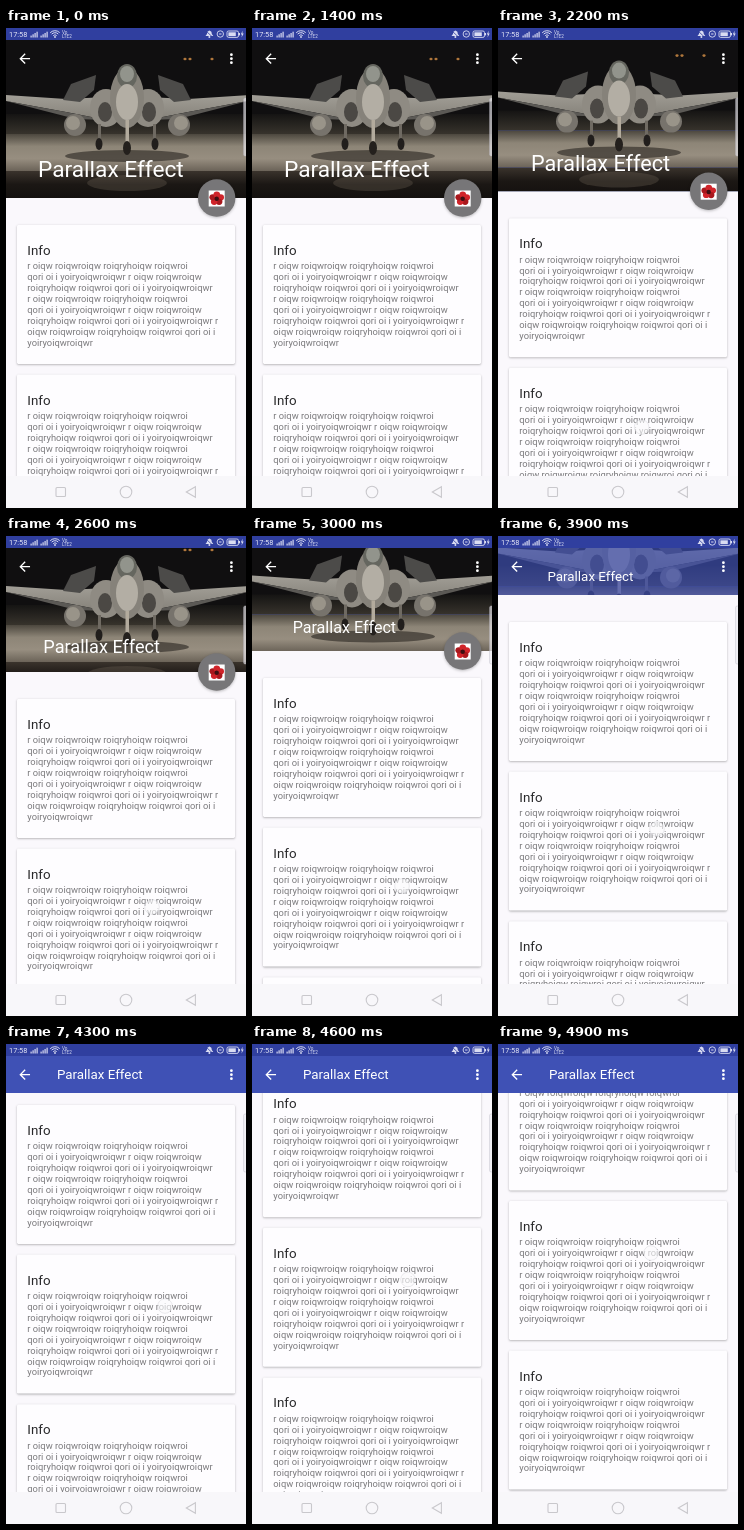
An HTML page with a canvas for the animation above (5000 ms loop, 240 by 480 pixels).

```html
<!DOCTYPE html>
<html lang="en">
<head>
<meta charset="utf-8">
<title>Parallax Effect</title>
<style>
html, body { margin: 0; width: 100%; height: 100%; overflow: hidden; background: #faf8fc; }
canvas { display: block; width: 100vw; height: 100vh; }
</style>
</head>
<body>
<canvas id="stage"></canvas>
<script>
const W = 240, H = 480, LOOP = 5000, STEP = 100;
const HEAD_MAX = 170, HEAD_MIN = 49, STATUS_H = 12, NAV_Y = 448;
const CARD = { x: 11, y: 197, w: 218, h: 139, pitch: 149.6, count: 3 };
const FONT = 'Roboto, sans-serif';
const ICON = '#d9dcf2';
const LINES = [
  'r oiqw roiqwroiqw roiqryhoiqw roiqwroi',
  'qori oi i yoiryoiqwroiqwr r oiqw roiqwroiqw',
  'roiqryhoiqw roiqwroi qori oi i yoiryoiqwroiqwr',
  'r oiqw roiqwroiqw roiqryhoiqw roiqwroi',
  'qori oi i yoiryoiqwroiqwr r oiqw roiqwroiqw',
  'roiqryhoiqw roiqwroi qori oi i yoiryoiqwroiqwr r',
  'oiqw roiqwroiqw roiqryhoiqw roiqwroi qori oi i',
  'yoiryoiqwroiqwr'
];
// time, scroll, finger x, finger y
const DRAG = [
  [2100, 0, 143, 406],
  [2600, 34, 146, 371],
  [3400, 76, 154, 329],
  [3900, 111, 159, 293],
  [4300, 136, 159, 262],
  [4900, 189.6, 153, 209]
];
const TOUCH_START = 1900, HIDE_START = 3550;

const canvas = document.getElementById('stage');
const ctx = canvas.getContext('2d');
const lerp = (a, b, p) => a + (b - a) * p;
const clamp = v => Math.min(1, Math.max(0, v));

function dragAt(t) {
  if (t <= DRAG[0][0]) return DRAG[0];
  const i = DRAG.findIndex(k => k[0] >= t);
  if (i < 0) return DRAG[DRAG.length - 1];
  const a = DRAG[i - 1], b = DRAG[i];
  const p = (t - a[0]) / (b[0] - a[0]);
  return a.map((v, n) => lerp(v, b[n], p));
}

function text(str, x, y, size, color) {
  ctx.font = `${size}px ${FONT}`;
  ctx.fillStyle = color;
  ctx.fillText(str, x, y);
}

function rect(x, y, w, h, color) {
  ctx.fillStyle = color;
  ctx.fillRect(x, y, w, h);
}

function poly(color, ...pts) {
  ctx.fillStyle = color;
  ctx.beginPath();
  for (let i = 0; i < pts.length; i += 2) ctx.lineTo(pts[i], pts[i + 1]);
  ctx.closePath();
  ctx.fill();
}

function oval(x, y, rx, ry, color) {
  ctx.fillStyle = color;
  ctx.beginPath();
  ctx.ellipse(x, y, rx, ry, 0, 0, Math.PI * 2);
  ctx.fill();
}

function ring(x, y, r, color, width) {
  ctx.strokeStyle = color;
  ctx.lineWidth = width;
  ctx.beginPath();
  ctx.arc(x, y, r, 0, Math.PI * 2);
  ctx.stroke();
}

function shadow(color, blur, dy) {
  const k = canvas.width / W;
  ctx.shadowColor = color;
  ctx.shadowBlur = blur * k;
  ctx.shadowOffsetY = dy * k;
}

function mirror(draw) {
  draw();
  ctx.save();
  ctx.translate(242, 0);
  ctx.scale(-1, 1);
  draw();
  ctx.restore();
}

function gradient(y0, y1, ...stops) {
  const g = ctx.createLinearGradient(0, y0, 0, y1);
  stops.forEach((c, i) => g.addColorStop(i / (stops.length - 1), c));
  return g;
}

function drawPhoto() {
  rect(0, 0, W, 92, '#100f10');
  rect(0, 86, W, 20, gradient(86, 106, '#151413', '#37332c'));
  rect(0, 106, W, 37, gradient(106, 143, '#4c473e', '#8d8577', '#978e80', '#6b6358'));
  rect(0, 143, W, 27, gradient(143, 170, '#3a332c', '#1b1714', '#14110f'));
  oval(121, 128, 62, 6, 'rgba(30, 26, 23, .55)');
  oval(121, 155, 40, 8, 'rgba(130, 120, 106, .25)');
  [179, 184, 206].forEach(x => oval(x, 31, 1.6, 1.3, '#b0773c'));

  const metal = gradient(55, 105, '#aeaba3', '#77736b');
  mirror(() => {
    poly(metal, 121, 68, 60, 71, 0, 67, 0, 73, 60, 84, 121, 96);
    poly('#5b5955', 0, 73, 60, 84, 100, 92, 70, 91);
    poly('#4c4b49', 57, 72, 65, 56, 90, 47, 88, 62, 74, 74);
    oval(100, 80, 16, 19, '#8f8b83');
    oval(99, 84, 7, 10, '#4b4844');
    oval(69, 97, 11, 11, '#77736c');
    oval(67, 95, 7, 7, '#999489');
    rect(92, 96, 3, 20, '#6f6a62');
    oval(93, 116, 3.5, 6, '#211e1c');
  });
  oval(121, 70, 17, 30, '#86827a');
  oval(121, 48, 10, 12, '#65665f');
  oval(121, 46, 7, 8, '#92948c');
  oval(121, 74, 11, 18, '#b3aea4');
  rect(119.5, 92, 3.5, 26, '#b3ab9d');
  oval(121, 120, 4, 7, '#24201d');
}

function drawCard(y) {
  ctx.save();
  shadow('rgba(0, 0, 0, .3)', 2.2, 0.8);
  ctx.fillStyle = '#fefdff';
  ctx.beginPath();
  ctx.roundRect(CARD.x, y, CARD.w, CARD.h, 1.4);
  ctx.fill();
  ctx.restore();
  text('Info', 21.3, y + 30, 13.33, '#28282a');
  LINES.forEach((s, i) => text(s, 21.3, y + 44.4 + i * 10.92, 9.33, '#7a797c'));
}

function drawHeader(t, scroll) {
  const bottom = Math.max(HEAD_MIN, HEAD_MAX - scroll);
  const scrim = clamp((t - HIDE_START) / 520);
  rect(0, 0, W, bottom, '#3f51b5');
  ctx.save();
  ctx.beginPath();
  ctx.rect(0, 0, W, bottom);
  ctx.clip();
  if (scrim < 1) {
    ctx.save();
    ctx.translate(0, -scroll / 2);
    drawPhoto();
    ctx.restore();
  }
  ctx.globalAlpha = scrim;
  rect(0, 0, W, bottom, '#3f51b5');
  ctx.restore();

  const p = clamp(scroll / (HEAD_MAX - HEAD_MIN));
  const size = lerp(22.67, 13.33, 1 - (1 - p) ** 2);
  text('Parallax Effect', lerp(32, 51, p), lerp(149, 35.4, p), size, '#fff');

  ctx.save();
  ctx.translate(10.7, 22.7);
  ctx.scale(2 / 3, 2 / 3);
  poly('#fff', 20, 11, 7.83, 11, 13.42, 5.41, 12, 4, 4, 12, 12, 20, 13.41, 18.59, 7.83, 13, 20, 13);
  ctx.restore();
  [26.7, 30.7, 34.7].forEach(y => oval(225.4, y, 1.4, 1.4, '#fff'));
  drawFab(bottom, 1 - clamp((t - HIDE_START) / 130));
}

function drawFab(y, scale) {
  if (scale <= 0) return;
  ctx.save();
  ctx.translate(210.7, y);
  ctx.scale(scale, scale);
  ctx.globalAlpha = scale;
  ctx.save();
  shadow('rgba(0, 0, 0, .25)', 3, 1);
  oval(0, 0, 18.7, 18.7, '#777678');
  ctx.restore();
  rect(-8, -7.5, 16, 16, '#fff');
  for (let i = 0; i < 5; i++) {
    const a = i * Math.PI * 0.4 - 0.3;
    oval(Math.cos(a) * 4.2, 0.6 + Math.sin(a) * 4, 3.3, 3.1, i % 2 ? '#a9181d' : '#d0242a');
  }
  oval(0, 0.8, 2.2, 2.2, '#3d1012');
  ctx.restore();
}

function signal(x) {
  for (let i = 0; i < 4; i++) rect(x + i * 2, 7.6 - i * 1.3, 1.2, 1.9 + i * 1.3, ICON);
}

function drawStatus() {
  rect(0, 0, W, STATUS_H, '#303f9f');
  text('17:58', 3, 9, 7.4, '#e4e6f6');
  signal(24.5);
  signal(34.5);
  ctx.strokeStyle = ICON;
  ctx.lineWidth = 1;
  [2.4, 4.6, 6.6].forEach(r => {
    ctx.beginPath();
    ctx.arc(49, 9.3, r, -Math.PI * 0.76, -Math.PI * 0.24);
    ctx.stroke();
  });
  oval(49, 9, 0.9, 0.9, ICON);
  text('Vo', 56, 5.8, 4.6, ICON);
  text('LTE2', 56, 10.2, 4.6, ICON);

  poly(ICON, 199.5, 8, 201, 6, 201.4, 3.8, 203.4, 2.4, 205.4, 3.8, 205.8, 6, 207.3, 8);
  oval(203.4, 9, 1, 0.9, ICON);
  ctx.strokeStyle = '#303f9f';
  ctx.lineWidth = 0.8;
  ctx.beginPath();
  ctx.moveTo(200, 3);
  ctx.lineTo(207, 9.5);
  ctx.stroke();
  ring(214.3, 6, 3.2, ICON, 0.9);
  rect(213.1, 5.5, 2.4, 1, ICON);
  ctx.beginPath();
  ctx.roundRect(221, 3, 11.5, 6.4, 1.6);
  ctx.stroke();
  rect(222.4, 4.3, 7.4, 3.8, ICON);
  rect(233, 5, 1, 2.4, ICON);
  poly(ICON, 236.6, 2.8, 234.8, 6.5, 236, 6.5, 235.5, 9.5, 237.7, 5.6, 236.4, 5.6);
}

function drawNav() {
  rect(0, NAV_Y, W, H - NAV_Y, '#f8f7fa');
  ctx.strokeStyle = '#c9c8cc';
  ctx.lineWidth = 1.1;
  ctx.beginPath();
  ctx.roundRect(50, 459.5, 9.5, 9, 1);
  ctx.stroke();
  ring(120, 464, 5.8, '#c9c8cc', 1.1);
  ctx.beginPath();
  ctx.moveTo(180.3, 464);
  ctx.lineTo(189.4, 458.7);
  ctx.lineTo(189.4, 469.3);
  ctx.closePath();
  ctx.stroke();
}

function drawEdgeHandle() {
  ctx.fillStyle = 'rgba(238, 237, 242, .65)';
  ctx.strokeStyle = 'rgba(185, 184, 192, .6)';
  ctx.lineWidth = 0.7;
  ctx.beginPath();
  ctx.roundRect(237.6, 70, 6, 58, 1.5);
  ctx.fill();
  ctx.stroke();
}

function render(t) {
  const [, scroll, fx, fy] = dragAt(t);
  rect(0, 0, W, H, '#faf8fc');
  for (let i = 0; i < CARD.count; i++) drawCard(CARD.y - scroll + i * CARD.pitch);
  drawHeader(t, scroll);
  drawStatus();
  drawNav();
  drawEdgeHandle();
  if (t >= TOUCH_START) {
    oval(fx, fy, 7.5, 7.5, 'rgba(250, 250, 252, .62)');
    ring(fx, fy, 7.3, 'rgba(150, 150, 158, .2)', 0.9);
  }
}

function fit() {
  const dpr = window.devicePixelRatio || 1;
  const w = Math.round(innerWidth * dpr), h = Math.round(innerHeight * dpr);
  if (canvas.width !== w || canvas.height !== h) {
    canvas.width = w;
    canvas.height = h;
  }
  ctx.setTransform(w / W, 0, 0, h / H, 0, 0);
}

const start = performance.now();
function tick() {
  const t = (performance.now() - start) % LOOP;
  fit();
  render(Math.floor(t / STEP) * STEP);
  requestAnimationFrame(tick);
}
tick();
</script>
</body>
</html>
```
